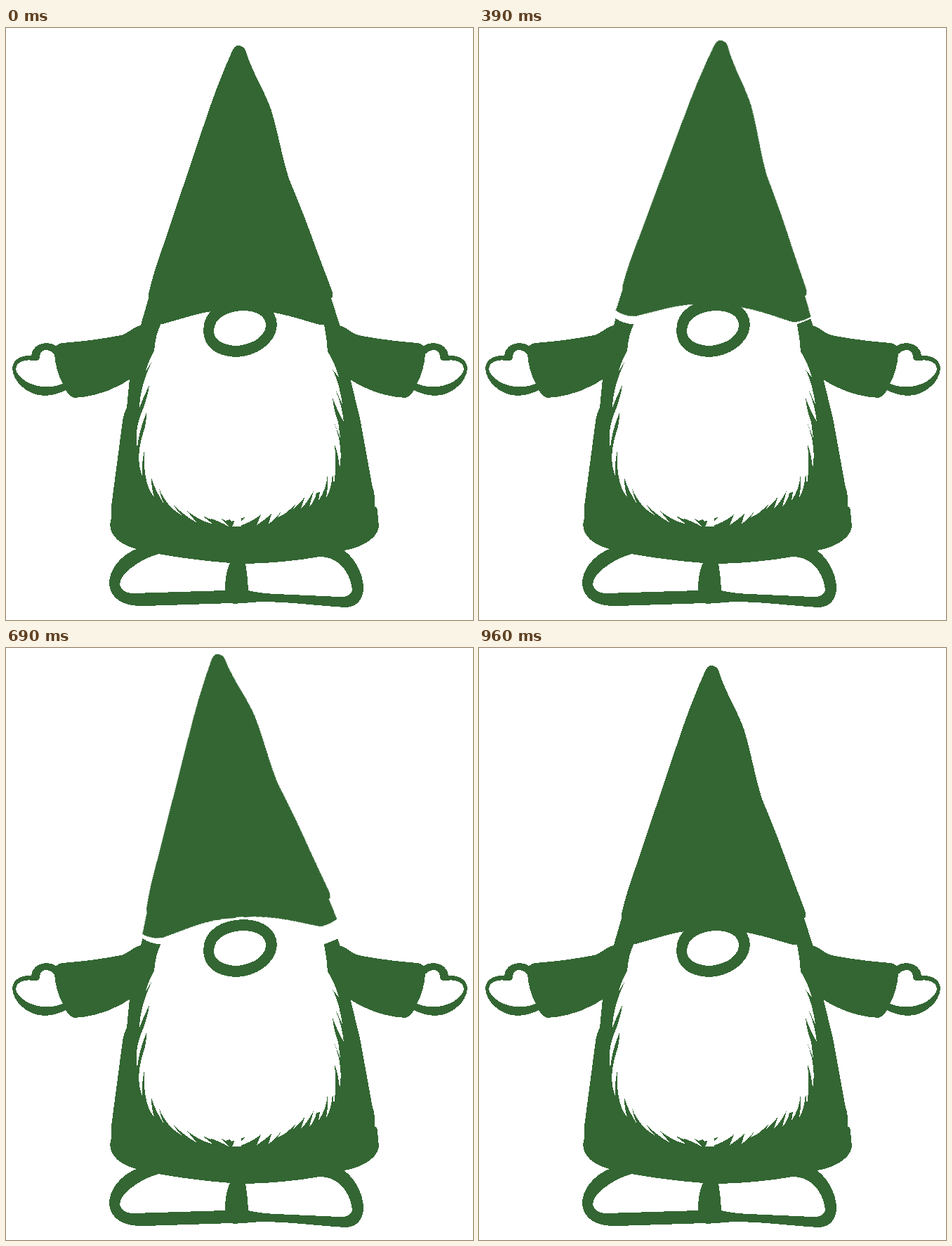
An HTML page for the animation above (990 ms loop, 665 by 842 pixels).

```html
<!DOCTYPE html>
<html lang="en">
<head>
<meta charset="utf-8">
<title>Gnome tipping its hat</title>
<style>
  html, body { margin: 0; width: 100%; height: 100%; overflow: hidden; background: #fff; }
  svg { display: block; width: 665px; height: 842px; fill: #363; shape-rendering: crispEdges; }
  .white { fill: #fff; }
  #hat { transform-origin: 334px 422px; }
</style>
</head>
<body>
<svg viewBox="0 0 665 842">
  <defs>
    <g id="arm">
      <path d="M194 422Q184 425 176 431Q168 436 164 437Q122 445 80 448Q75 449 71 452
        C64 447 53 447 46 451Q37 456 36 466C21 465 9 472 9 485C11 504 31 523 56 523
        Q72 522 85 515Q90 524 97 526C121 525 151 517 177 499L200 480Z"/>
      <path class="white" d="M56 458Q64 458 69 464Q71 489 81 506C61 514 36 511 21 497
        Q14 490 14 484C15 474 28 471 38 473Q46 475 48 469Q48 459 56 458Z"/>
    </g>
  </defs>

  <!-- boots -->
  <path d="M188 740C161 750 146 773 147 792C150 814 170 823 198 822L321 818Q327 820 332 818
    Q340 819 346 817C392 814 430 821 484 824Q506 823 509 799C510 778 497 754 481 743Z"/>
  <path class="white" d="M217 748C190 756 162 776 162 791Q165 804 182 804L312 800Q312 774 319 761Q267 757 217 748Z"/>
  <path class="white" d="M341 762Q344 779 345 800Q360 804 385 805L474 809Q492 810 493 798C490 773 472 751 446 752Q394 761 341 762Z"/>

  <!-- coat -->
  <path d="M194.500 413Q204 420 220 421.500H453L472.500 413.500L476 424L491 502L504 555L522 654
    Q526 663 525 681Q529 681 529 687L531 709C529 728 502 740 481 743L446 752Q392 762 332 761
    Q269 757 217 748L186 741C158 734 143 717 150 697L150 680L166 559Q167 550 172 540L176 499L192 423Z"/>
  <use href="#arm"/>
  <use href="#arm" transform="matrix(-1 0 0 1 666 0)"/>

  <!-- beard -->
  <path class="white" d="M335 410H220V422Q213 436 211 459Q204 471 199 488L208 474
    Q191 509 190 540Q196 524 204 508Q203 520 195 542Q182 571 187 597Q189 574 200 547
    Q200 564 195 577Q184 612 194 637Q193 618 197 601Q195 649 211 667Q207 655 207 640
    Q213 659 225 677Q220 666 218 655Q228 680 250 693Q242 685 238 677Q251 692 271 703L258 687
    Q274 700 295 706L280 694L292 699L290 697Q305 702 317 709L305 697L313 701L318 699L321 702L326 700L322 709H335Z"/>
  <path class="white" d="M334 410H453V422Q457 441 458 460Q467 474 474 496Q466 489 460 477
    Q474 499 479 535L469 514Q478 535 481 560Q474 549 465 526Q467 545 473 560L476 583L466 558
    Q481 594 475 627Q474 608 468 593Q471 625 467 649L465 633Q464 655 456 668Q459 651 458 635
    Q456 657 445 672L447 660L442 661Q440 672 432 681L438 658Q430 674 420 684L426 666
    Q418 677 409 684L413 676Q400 691 387 696L393 686Q382 701 374 705L378 691
    Q368 700 357 707L363 692Q347 705 328 709L340 696L333 698L331 703H325Z"/>

  <!-- nose -->
  <path fill-rule="evenodd" d="M281 430C281 402 306 386 340 386C367 387 386 401 386 423C384 450 354 468 327 468
    C299 467 281 453 281 430ZM296 431C296 412 316 402 340 402C360 403 370 411 370 424C368 442 345 452 325 452C307 450 296 443 296 431Z"/>

  <path id="hat" d="M322 33Q325 25 331 25Q338 25 341 32Q348 54 364 85Q375 108 378 118C388 151 395 193 404 217
    Q425 267 442 315L465 376V382L463 384L472.500 414Q461 420 453 421.500H445
    C423 416 385 401 340 400.500C313 400 288 402 265 409L221 421.500Q203 421 194.500 413.500L203 384V378
    Q209 351 223 312L281 140Q301 79 322 33Z"/>
</svg>
<script>
  const FRAME = 30, FRAMES = 33;
  const pose = (frame, lift, angle) => ({
    offset: frame / FRAMES,
    transform: `translateY(${-lift}px) rotate(${angle}deg)`,
    easing: "steps(8, end)"
  });

  document.getElementById("hat").animate([
    pose(0, 0, 0),
    pose(8, 20, 5),
    pose(16, 0, 0),
    pose(24, 20, -5),
    pose(32, 0, 0),
    pose(33, 0, 0)
  ], { duration: FRAME * FRAMES, iterations: Infinity });
</script>
</body>
</html>
```
